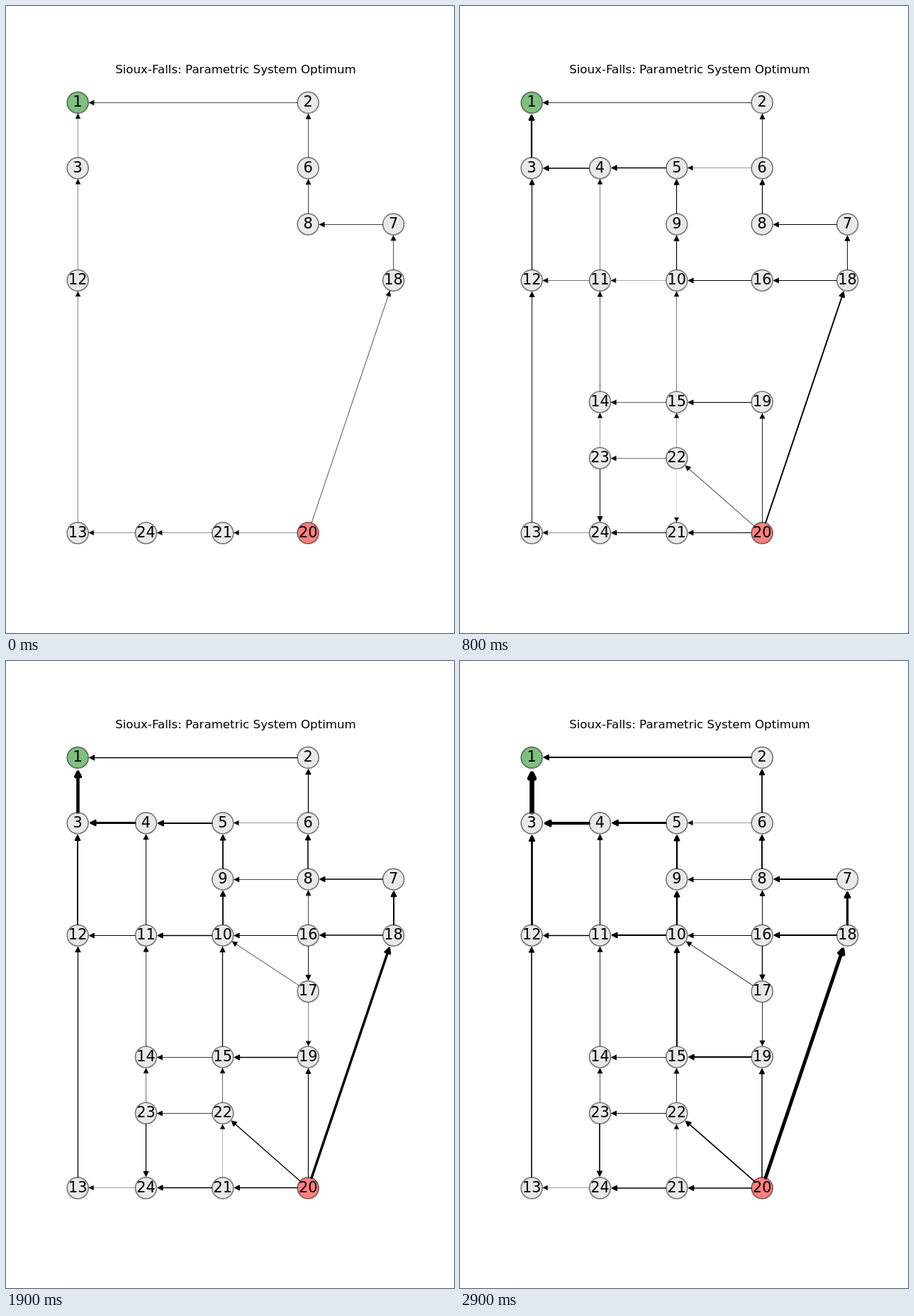
An HTML page that plays this animation: 632x885 px, repeating every 3 s.

```html
<!DOCTYPE html>
<html lang="en">
<head>
<meta charset="utf-8">
<title>Parametric System Optimum</title>
<style>
  html, body { margin: 0; width: 632px; height: 885px; overflow: hidden; background: #fff; }
  svg { display: block; }
  text { font-family: "DejaVu Sans", sans-serif; text-anchor: middle; fill: #000; }
  .title { font-size: 16.67px; }
  .label { font-size: 20.83px; }
  .edge { fill: #000; stroke: #000; stroke-linejoin: round; stroke-linecap: round; }
  .node { stroke: #000; stroke-width: 1.7; opacity: 1; fill-opacity: .5; stroke-opacity: .5; }
</style>
</head>
<body>
<svg id="stage" width="632" height="885" viewBox="0 0 632 885">
  <text class="title" x="324" y="95">Sioux-Falls: Parametric System Optimum</text>
  <g id="edges"></g>
  <g id="nodes"></g>
</svg>
<script>
const STEP = 100, STEPS = 30, R = 15.2, HEAD = 6.67, HALF = 3.33;

// Node ids on the street grid; 0 is an empty crossing.
const cols = [50, 130, 220, 320, 420];
const rows = [510, 440, 380, 320, 260, 190, 130, 50];
const grid = [
  [1, 0, 0, 2, 0], [3, 4, 5, 6, 0], [0, 0, 9, 8, 7], [12, 11, 10, 16, 18],
  [0, 0, 0, 17, 0], [0, 14, 15, 19, 0], [0, 23, 22, 0, 0], [13, 24, 21, 20, 0]
];

// Routes: [first step, width, (middle step, width,) final width]
const routes = {
  '20 18': [0, .7, 4, 1.4, 4.9],
  '18 7': [0, .7, 10, 1, 3.2],
  '7 8': [0, .75, 1.9],
  '8 6': [0, .75, 4, 1.05, 1.9],
  '6 2 1': [0, .7, 8, .8, 1.8],
  '20 21 24': [0, .45, 4, 1, 1.6],
  '24 13': [0, .45, .35],
  '13 12': [0, .45, 4, .8, 1.6],
  '12 3': [0, .45, 4, .9, 2.7],
  '3 1': [0, .4, 4, 1.4, 6.6],
  '18 16': [1, .4, 12, 1.5, 2.1],
  '16 10': [1, .4, 8, 1.15, 1.15],
  '10 9 5': [1, .4, 8, 1.2, 2.3],
  '5 4': [1, .6, 4, 1.1, 2.8],
  '4 3': [1, .6, 4, 1.05, 4],
  '6 5': [1, .4, .38],
  '20 22': [2, .4, 8, .9, 1.75],
  '22 23': [2, .45, .9],
  '23 24': [2, .75, 1.65],
  '22 21': [2, .36, 12, 0, 0],
  '20 19': [3, .15, 8, .85, 1.5],
  '19 15': [3, .1, 8, 1.05, 1.9],
  '15 14 11': [3, .2, 8, .65, .85],
  '11 12': [3, .15, 12, .85, 1.35],
  '11 4': [3, .15, 12, .8, 1.3],
  '15 10': [5, .3, 12, .9, 1.9],
  '23 14': [6, .35, .7],
  '22 15': [6, .3, .85],
  '10 11': [7, .2, 16, 1.3, 2],
  '16 17': [10, .5, 1.4],
  '17 10': [10, .5, .95],
  '16 8 9': [11, .2, 16, .65, .95],
  '17 19': [15, .25, 22, .6, .8],
  '21 22': [19, .3, .4]
};

const make = (parent, tag, attrs) => {
  const el = document.createElementNS('http://www.w3.org/2000/svg', tag);
  for (const k in attrs) el.setAttribute(k, attrs[k]);
  return document.getElementById(parent).appendChild(el);
};

const nodes = {};
grid.forEach((row, j) => row.forEach((id, i) => {
  if (!id) return;
  const x = 101.2 + (cols[i] - 50) * 1.2037, y = 136.4 + (510 - rows[j]) * 1.3207;
  const fill = id === 1 ? 'green' : id === 20 ? 'red' : '#d3d3d3';
  const parts = [
    make('nodes', 'circle', { class: 'node', cx: x, cy: y, r: 15, fill }),
    make('nodes', 'text', { class: 'label', x, y: Math.round(y + 5.8) })
  ];
  parts[1].textContent = id;
  nodes[id] = { x, y, parts, first: STEPS };
}));

const edges = [];
for (const [route, keys] of Object.entries(routes)) {
  const ids = route.split(' ');
  for (const id of ids) nodes[id].first = Math.min(nodes[id].first, keys[0]);
  for (let i = 1; i < ids.length; i++) {
    edges.push({ a: nodes[ids[i - 1]], b: nodes[ids[i]], keys, el: make('edges', 'path', { class: 'edge' }) });
  }
}

function widthAt(keys, step) {
  if (step < keys[0]) return 0;
  const k = [...keys.slice(0, -1), STEPS - 1, keys[keys.length - 1]];
  let i = 0;
  while (i + 4 < k.length && step > k[i + 2]) i += 2;
  return k[i + 1] + (k[i + 3] - k[i + 1]) * (step - k[i]) / (k[i + 2] - k[i]);
}

// Straight grid lines sit on whole or half pixels, by line weight.
function snap(v, w) {
  return Math.max(1, Math.round(w)) % 2 ? Math.floor(v) + .5 : Math.round(v);
}

function arrow(a, b, w) {
  const len = Math.hypot(b.x - a.x, b.y - a.y);
  const ux = (b.x - a.x) / len, uy = (b.y - a.y) / len;
  const back = R + w * 1.118;
  const p = { x: a.x + ux * R, y: a.y + uy * R };
  const q = { x: b.x - ux * back, y: b.y - uy * back };
  if (Math.abs(ux) < .001) p.x = q.x = snap(a.x, w);
  if (Math.abs(uy) < .001) p.y = q.y = snap(a.y, w);
  const wing = s => `${q.x - ux * HEAD - uy * HALF * s} ${q.y - uy * HEAD + ux * HALF * s}`;
  return `M${p.x} ${p.y}L${q.x} ${q.y}M${wing(1)}L${q.x} ${q.y}L${wing(-1)}Z`;
}

let shown = -1;
function draw(now) {
  const step = Math.floor(now / STEP) % STEPS;
  if (step !== shown) {
    shown = step;
    for (const { a, b, keys, el } of edges) {
      const w = widthAt(keys, step);
      el.setAttribute('d', w > 0 ? arrow(a, b, w) : '');
      el.setAttribute('stroke-width', w);
    }
    for (const n of Object.values(nodes)) {
      for (const el of n.parts) el.style.display = step < n.first ? 'none' : '';
    }
  }
}

const start = performance.now();
function tick() {
  draw(performance.now() - start);
  requestAnimationFrame(tick);
}
tick();
</script>
</body>
</html>
```
